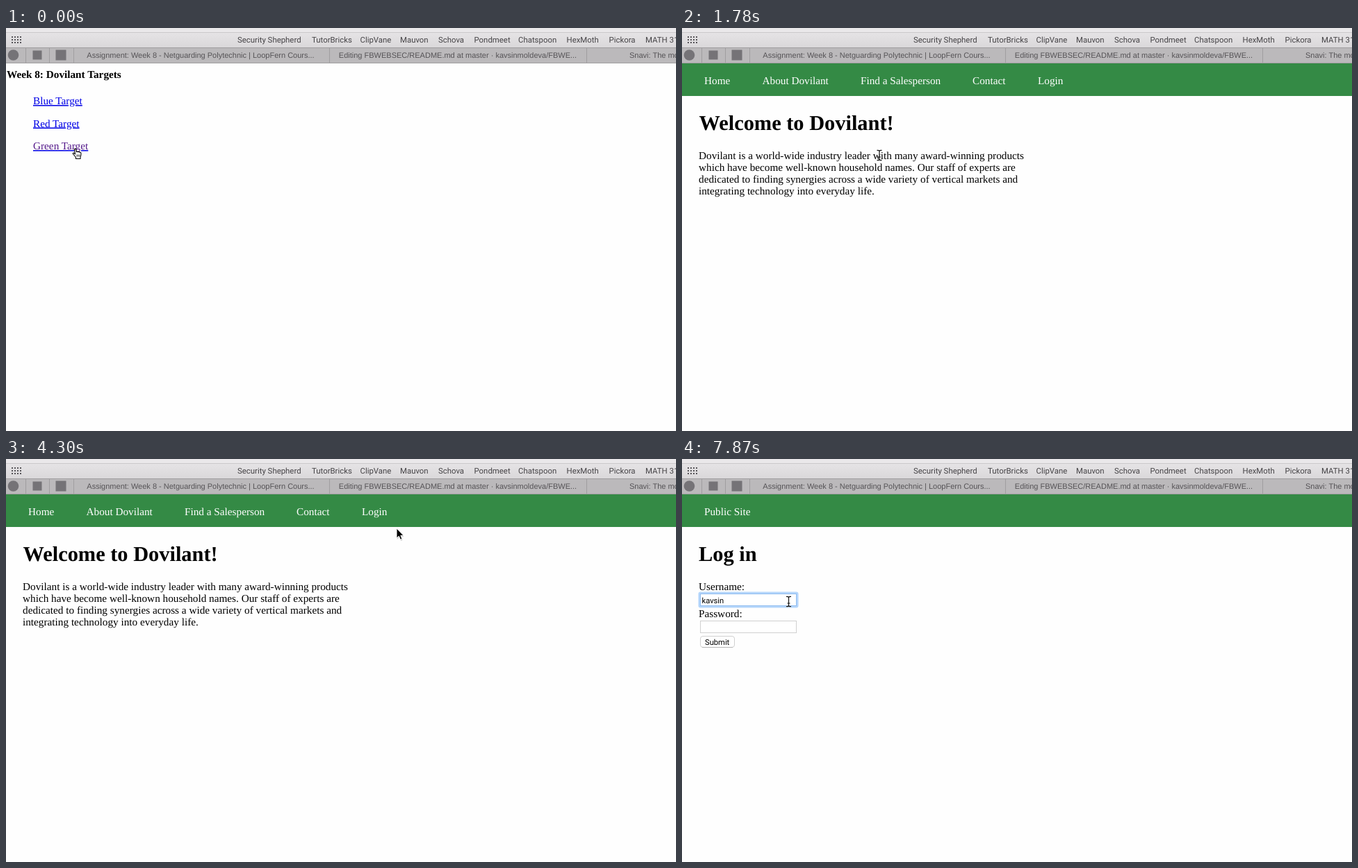
An HTML page that plays this animation: 964 px wide and 581 px high, repeating every 8000 ms.

```html
<!DOCTYPE html>
<html lang="en">
<head>
<meta charset="utf-8">
<title>Login walkthrough</title>
<style>
  html, body { margin: 0; width: 100%; height: 100%; overflow: hidden; background: #fefefe; }
  svg { display: block; width: 100%; height: 100%; }
  text { text-rendering: geometricPrecision; white-space: pre; }
  .bookmarks, .control { font: 11.4px Roboto, sans-serif; fill: #454346; }
  .control { font-size: 11.2px; fill: #000; }
  .tabs { font: 11px "Liberation Sans", sans-serif; fill: #555356; text-anchor: middle; }
  .page { font: 15.25px "Liberation Serif", serif; }
  .page .title { font-weight: bold; }
  .page h1, .page .big { font-size: 30.4px; font-weight: bold; }
  .nav { fill: #fff; }
  .links { fill: #0000e6; text-decoration: underline; }
  .visited { fill: #551a8b; }
  .visited.active { fill: #f00; }
  .cursor { stroke-linejoin: round; }
</style>
</head>
<body>
<svg viewBox="0 0 964 581" preserveAspectRatio="none">
  <defs>
    <linearGradient id="bar" x2="0" y2="1">
      <stop stop-color="#e5e3e5"/><stop offset="1" stop-color="#dad8da"/>
    </linearGradient>
  </defs>
  <rect width="964" height="581" fill="#fefefe"/>

  <g id="browser">
    <rect width="964" height="6" fill="#eae8ea"/>
    <rect y="6" width="964" height="1" fill="#cac8ca"/>
    <rect y="7" width="964" height="21" fill="url(#bar)"/>
    <rect y="28" width="964" height="23" fill="#bbb9bb"/>
    <path d="M0 28.5H964M0 50.5H964M28.5 28V51M62.5 28V51M97.5 28V51M465.5 28V51M835.5 28V51" stroke="#a09ea0"/>
    <path d="M8 13H22M8 17H22M8 21H22" stroke="#565458" stroke-width="2" stroke-dasharray="2"/>
    <g fill="#757377">
      <circle cx="10.5" cy="39" r="7.8"/>
      <rect x="38.5" y="32.5" width="13" height="13"/>
      <rect x="71.5" y="31.5" width="15" height="15"/>
    </g>
    <g class="bookmarks">
      <text x="333" y="21">Security Shepherd</text>
      <text x="440" y="21">TutorBricks</text>
      <text x="509.5" y="21">ClipVane</text>
      <text x="567" y="21">Mauvon</text>
      <text x="622" y="21">Schova</text>
      <text x="673.5" y="21">Pondmeet</text>
      <text x="737" y="21">Chatspoon</text>
      <text x="806.5" y="21">HexMoth</text>
      <text x="867.5" y="21">Pickora</text>
      <text x="920" y="21">MATH 31</text>
    </g>
    <g class="tabs">
      <text x="280" y="43">Assignment: Week 8 - Netguarding Polytechnic | LoopFern Cours...</text>
      <text x="650" y="43">Editing FBWEBSEC/README.md at master · kavsinmoldeva/FBWE...</text>
      <text x="897" y="43" text-anchor="start" style="text-anchor:start">Snavi: The mo</text>
    </g>
  </g>

  <g class="page" id="targets">
    <text class="title" x="1" y="72">Week 8: Dovilant Targets</text>
    <g class="links">
      <text x="39" y="110">Blue Target</text>
      <text x="39" y="142.5">Red Target</text>
      <text x="39" y="175" class="visited" id="green">Green Target</text>
    </g>
  </g>

  <g class="page" id="home">
    <rect y="51" width="964" height="47" fill="#348a45"/>
    <g class="nav">
      <text x="32" y="80.5">Home</text>
      <text x="115.5" y="80.5">About Dovilant</text>
      <text x="257" y="80.5">Find a Salesperson</text>
      <text x="418" y="80.5">Contact</text>
      <text x="512" y="80.5">Login</text>
    </g>
    <text class="big" x="24.5" y="147">Welcome to Dovilant!</text>
    <text x="24" y="188.5">Dovilant is a world-wide industry leader with many award-winning products</text>
    <text x="24" y="205.7">which have become well-known household names. Our staff of experts are</text>
    <text x="24" y="223">dedicated to finding synergies across a wide variety of vertical markets and</text>
    <text x="24" y="240.3">integrating technology into everyday life.</text>
  </g>

  <g class="page" id="login">
    <rect y="51" width="964" height="47" fill="#348a45"/>
    <text class="nav" x="32" y="80.5">Public Site</text>
    <text class="big" x="24" y="147">Log in</text>
    <text x="24" y="188.5">Username:</text>
    <text x="24" y="227.5">Password:</text>
    <g fill="#fff" stroke="#d0d0d0">
      <rect x="26.5" y="194.5" width="138" height="17"/>
      <rect x="26.5" y="233.5" width="138" height="17"/>
      <rect x="26.5" y="255.5" width="49" height="16" rx="3.5"/>
    </g>
    <path d="M29 271.5H73" stroke="#b4b4b4"/>
    <text class="control" x="33" y="268">Submit</text>
    <g id="focus">
      <rect x="25" y="193" width="141" height="20" rx="1.5" fill="none" stroke="#b5d6fb" stroke-width="3"/>
      <rect x="26.5" y="194.5" width="138" height="17" fill="#fff" stroke="#92bdf0"/>
      <text class="control" id="typed" x="28.5" y="207.5"></text>
      <rect id="caret" x="29" y="197" width="1" height="12"/>
    </g>
  </g>

  <g class="cursor" id="hand">
    <path d="M5 15.5V13.5C3.5 11.5 2 9.8 1 8.6C.2 7.6 1.6 6.5 2.6 7.4L4 8.8L3 2.2C2.8.8 4.8.4 5.1 1.8L6 5.6C6.6 4.6 8 4.8 8.1 5.8C8.8 4.9 10.2 5.3 10.2 6.3C11 5.7 12.2 6.2 12.4 7.2C12.8 10 12.3 11.8 11.5 13.2V15.5Z" fill="#fff" stroke="#000" stroke-width="1.1"/>
    <path d="M6.5 9.5V12.5M8.4 9.5V12.5M10.3 9.5V12.5" stroke="#000" stroke-width=".8"/>
  </g>
  <g class="cursor" id="beam" fill="none">
    <path id="stem" d="M-3.5-7.2H-2Q0-7.2 0-5.5Q0-7.2 2-7.2H3.5M0-5.5V5.5M-3.5 7.2H-2Q0 7.2 0 5.5Q0 7.2 2 7.2H3.5M-2 2.5H2" stroke="#fff" stroke-opacity=".6" stroke-width="2.4"/>
    <use href="#stem" style="display:none"/>
    <path d="M-3.5-7.2H-2Q0-7.2 0-5.5Q0-7.2 2-7.2H3.5M0-5.5V5.5M-3.5 7.2H-2Q0 7.2 0 5.5Q0 7.2 2 7.2H3.5M-2 2.5H2" stroke="#111" stroke-width="1.2"/>
  </g>
  <g class="cursor" id="arrow">
    <path d="M0 1V15L3.3 12L5.6 17L8 16L5.8 11H10Z" fill="#000" opacity=".18" transform="translate(.6 1)"/>
    <path d="M0 0V14L3.3 11.2L5.5 16.2L7.9 15.2L5.8 10.3H10Z" fill="#000" stroke="#fff" stroke-width="1"/>
  </g>
</svg>
<script>
  const LOOP = 8000;
  const $ = id => document.getElementById(id);

  const pages = [[0, "targets"], [1780, "home"], [4740, "login"]];

  // time, cursor shape, x, y
  const pointer = [
    [0, "hand", 95.5, 173], [150, "hand", 100, 172], [300, "hand", 105, 171],
    [440, "hand", 109, 172], [590, "hand", 111, 173],
    [1190, "beam", 150, 180], [1330, "beam", 208, 182], [1480, "beam", 262, 183],
    [1630, "beam", 284, 183.5], [1920, "beam", 278, 202], [2070, "beam", 273, 217],
    [2220, "beam", 385, 190], [2370, "arrow", 493, 148],
    [2670, "arrow", 520.5, 118], [2810, "arrow", 528, 104], [2960, "arrow", 534, 92],
    [3100, "arrow", 533, 84], [3250, "arrow", 531.5, 80],
    [4150, "arrow", 543, 87], [4290, "arrow", 562, 100], [4440, "arrow", 505, 120],
    [4590, "arrow", 390, 150], [4740, "arrow", 270, 178], [4880, "arrow", 185, 195],
    [5030, "beam", 154.5, 205], [5180, "beam", 153.5, 205.5]
  ];

  // time, typed text, caret shown
  const field = [
    [5630, "", true], [6070, "", false], [6520, "", true],
    [7120, "ka", true], [7270, "kavs", true], [7420, "kavsin", true], [7870, "kavsin", false]
  ];

  const at = (steps, t) => steps.filter(step => step[0] <= t).pop();
  const show = (id, on) => { $(id).style.display = on ? "" : "none"; };

  function draw() {
    const t = performance.now() % LOOP;

    const [, page] = at(pages, t);
    for (const [, id] of pages) show(id, id === page);
    $("green").classList.toggle("active", t >= 1040);

    const [, shape, x, y] = at(pointer, t);
    for (const id of ["hand", "beam", "arrow"]) show(id, id === shape);
    $(shape).setAttribute("transform", `translate(${x} ${y})`);

    const input = at(field, t);
    show("focus", input);
    if (input) {
      const [, value, caret] = input;
      $("typed").textContent = value;
      $("caret").setAttribute("x", value ? Math.round(28.5 + $("typed").getComputedTextLength()) : 29);
      show("caret", caret);
    }
    requestAnimationFrame(draw);
  }
  draw();
</script>
</body>
</html>
```
